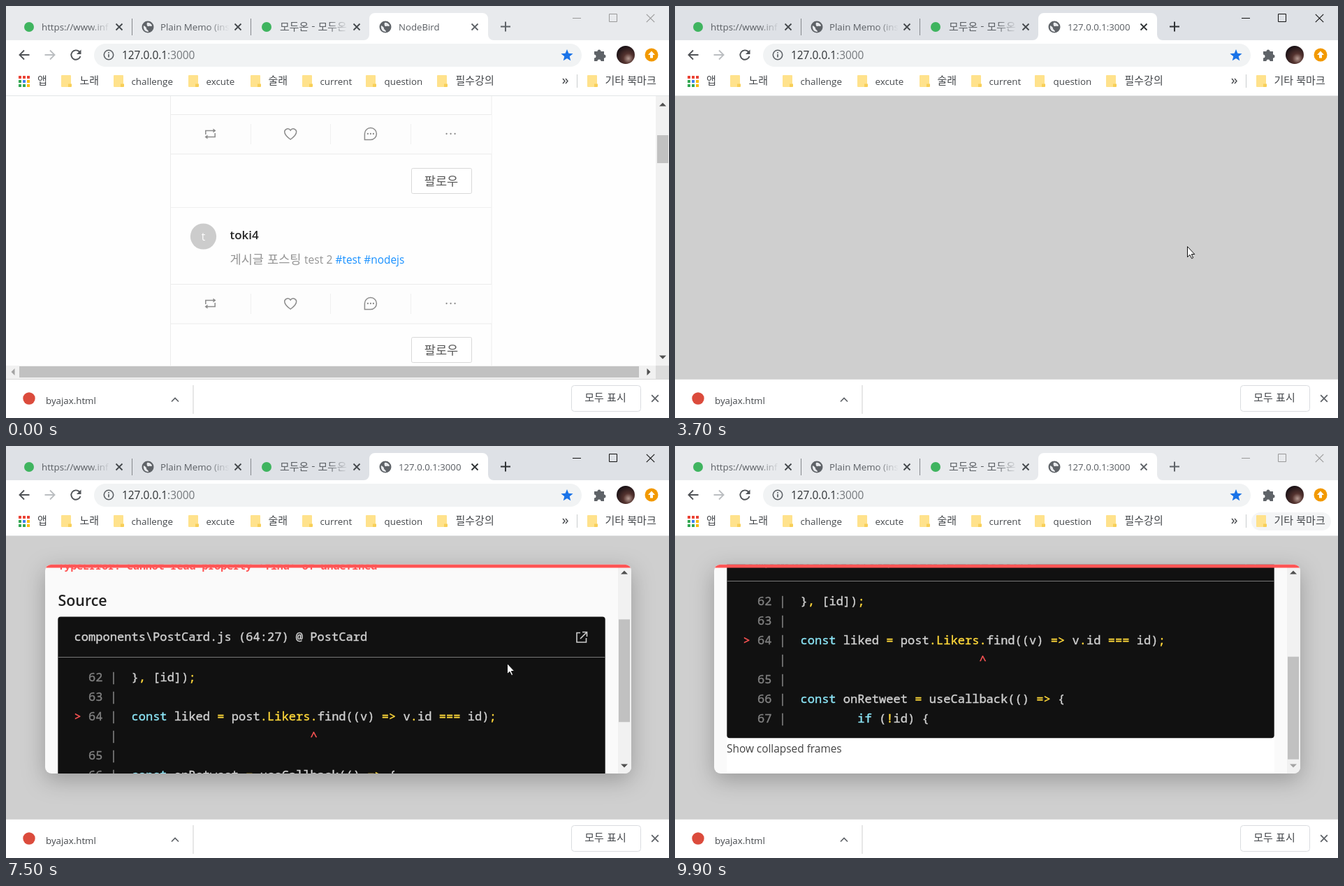
Write an HTML page that moves like this. It is 949 px wide and 590 px high and loops after 10 s.

```html
<!DOCTYPE html>
<html lang="ko">
<head>
<meta charset="utf-8">
<title>Browser window</title>
<style>
html, body { margin: 0; width: 100%; height: 100%; overflow: hidden; background: #fff; }
svg { display: block; }
text { font-family: "Open Sans", "Noto Sans", sans-serif; }
.ko { font-family: "Noto Sans CJK KR", "Noto Sans CJK", sans-serif; }
.mono { font-family: "Noto Sans Mono", monospace; }
.code { font-size: 17.07px; fill: currentColor; stroke: currentColor; stroke-width: .4px; }
.mid { text-anchor: middle; }
.line { fill: none; stroke: currentColor; }
</style>
</head>
<body>
<svg id="stage" width="949" height="590" viewBox="0 0 949 590"></svg>
<script>
const range = n => [...Array(n).keys()];
const rect = (x, y, w, h, fill, more = '') =>
  `<rect x="${x}" y="${y}" width="${w}" height="${h}" fill="${fill}" ${more}/>`;
const disc = (x, y, r, fill) => `<circle cx="${x}" cy="${y}" r="${r}" fill="${fill}"/>`;
const text = (x, y, size, fill, s, more = '') =>
  `<text x="${x}" y="${y}" font-size="${size}" fill="${fill}" ${more}>${s}</text>`;
const ko = (x, y, size, fill, s) => text(x, y, size, fill, s, 'class="ko"');
const mono = (x, y, s, color = '#d0d0d0') =>
  `<text x="${x}" y="${y}" color="${color}" class="mono code">${s}</text>`;
const line = (d, color, width = 1, more = '') =>
  `<path d="${d}" fill="none" stroke="${color}" stroke-width="${width}" ${more}/>`;
const at = (x, y, s, more = '') => `<g transform="translate(${x} ${y})" ${more}>${s}</g>`;
const cross = (x, y, r, color, width) =>
  line(`M${x - r} ${y - r}l${2 * r} ${2 * r}m0 ${-2 * r}l${-2 * r} ${2 * r}`, color, width);
const arrowHead = (x, y, turn, id = '', fill = '#505050') =>
  `<path ${id && `id="${id}"`} d="M-5 2.5L0-2.5 5 2.5z" fill="${fill}" transform="translate(${x} ${y}) rotate(${turn})"/>`;

// Browser frame
const globe = x => disc(x, 30, 8.5, '#5f6368') +
  at(x, 30, '<path d="M-6-2C-4-1-2 0-2 2S1 4 1 7C-4 7-7 3-6-2zM-1-6C1-7 5-5 6-2 5 0 3-2 1-1S-2-4-1-6z" fill="#e8eaed"/>');

function tabTitle(x, id, s, cls = '') {
  return `<linearGradient id="${id}" gradientUnits="userSpaceOnUse" x1="${x + 68}" x2="${x + 99}">
    <stop stop-color="#5a5e63"/><stop offset="1" stop-color="#5a5e63" stop-opacity="0"/></linearGradient>` +
    text(x, 34.5, cls ? 14.9 : 13.3, `url(#${id})`, s, cls);
}

const folder = x => at(x, 99, rect(0, 0, 14, 17, '#ffe28c', 'rx="1"') +
  '<path d="M10 17V12.500h5V16a1 1 0 0 1-1 1z" fill="#f8cf58"/>');

const tabs = rect(0, 0, 949, 49, '#dee1e6', 'id="strip"') +
  line('M180.500 18V42M350.500 18V42', '#85888c') +
  '<path d="M512 49a8 8 0 0 0 8-8V18a8 8 0 0 1 8-8H682a8 8 0 0 1 8 8V41a8 8 0 0 0 8 8z" fill="#fff"/>' +
  disc(33, 30, 7, '#3fb45f') + disc(373, 30, 7, '#3fb45f') + globe(203) + globe(543) +
  tabTitle(51, 'fadeA', 'https://www.inf') + tabTitle(221, 'fadeB', 'Plain Memo (inse') +
  tabTitle(392, 'fadeC', '모두온 - 모두온', 'class="ko"') +
  text(562, 34.5, 13.2, '#5a5e63', '', 'id="title"') +
  [162, 332, 502].map(x => cross(x, 30, 4.5, '#45494d', 1.8)).join('') +
  '<g id="controls">' + cross(671, 30, 4.5, 'currentColor', 1.8) +
  line('M708 29.500h14M715 22.500v14', 'currentColor', 2) + '</g><g id="buttons">' +
  line('M811 17.500h12M863.500 11.500h11v11h-11z', 'currentColor') + cross(922.5, 17.5, 5.7, 'currentColor', 1.1) + '</g>';

const star = range(10).map(i => {
  const a = i * Math.PI / 5, r = i % 2 ? 3.9 : 9;
  return [803 + r * Math.sin(a), 71 - r * Math.cos(a)].map(v => v.toFixed(1));
}).join(' ');

const toolbar = rect(0, 49, 949, 80, '#fff') +
  line('M33.500 70H19.500M26 63.500L19.500 70 26 76.500', '#505357', 1.9) +
  line('M55.500 70H69.500M63 63.500L69.500 70 63 76.500', '#bbbec1', 1.9) +
  line('M105 65.500A6.700 6.700 0 1 0 106.500 72', '#505357', 1.9) + '<path d="M107.500 62.500V69H101z" fill="#505357"/>' +
  rect(126, 54, 698, 33, '#f1f3f4', 'rx="16.5"') +
  '<circle cx="147" cy="70" r="6.700" fill="none" stroke="#5f6368" stroke-width="1.600"/>' +
  line('M147 69v4.500M147 66v1.700', '#5f6368', 1.7) +
  text(166, 76.3, 15.4, '#303336', '127.0.0.1<tspan fill="#74787c">:3000</tspan>') +
  `<polygon points="${star}" fill="#1a73e8"/>` +
  '<path d="M842 65h4.500a2.500 2.500 0 1 1 5 0H856v4.500a2.500 2.500 0 1 1 0 5V79h-4.500a2.500 2.500 0 1 0-5 0H842v-4.500a2.500 2.500 0 1 0 0-5z" fill="#5f6368"/>' +
  `<radialGradient id="photo" cx=".65" cy=".7" r=".7"><stop stop-color="#b59a92"/>
   <stop offset=".4" stop-color="#54332f"/><stop offset="1" stop-color="#1b1216"/></radialGradient>` +
  disc(887, 70, 13, 'url(#photo)') + disc(924, 70, 9.5, '#f29900') +
  '<path d="M924 64.500l5 5.500h-3v4.500h-4V70h-3z" fill="#fff"/>';

const dots = ['#ea4335', '#ea4335', '#ea4335', '#34a853', '#4285f4', '#fbbc05', '#34a853', '#34a853', '#fbbc05'];
const label = '#45484c';
const bookmarks = rect(825, 95, 114, 26, '#f4f5f6', 'rx="13" id="pill"') +
  dots.map((c, i) => rect(18 + i % 3 * 6, 100 + (i / 3 | 0) * 6, 4, 4, c)).join('') +
  [79, 154, 261, 350, 424, 515, 617, 832].map(folder).join('') +
  [[45, '앱'], [105.5, '노래'], [375.5, '술래'], [643.5, '필수강의'], [857.5, '기타 북마크']]
    .map(([x, s]) => ko(x, 112.3, 15, label, s)).join('') +
  [[179.5, 'challenge'], [286.5, 'excute'], [449.5, 'current'], [541.5, 'question']]
    .map(([x, s]) => text(x, 112.7, 13.4, label, s)).join('') +
  line('M797 104l3 3.500-3 3.500M801 104l3 3.500-3 3.500', label, 1.4) +
  line('M817.500 98V117', '#c9cccf') + line('M0 128.500H949', '#e3e5e7');

const downloads = rect(0, 534, 949, 56, '#fff') + line('M0 534.500H949', '#d8d8d8') +
  disc(33, 562, 8.7, '#db4b3c') + text(57, 570, 13.3, label, 'byajax.html') +
  line('M237 566.500l5-5 5 5', '#5f6368', 1.7) + line('M268 543V584', '#cfcfcf') +
  rect(809.5, 543.5, 99, 37, '#fff', 'rx="4" stroke="#dadce0"') +
  text(858, 566.3, 15, label, '모두 표시', 'class="ko mid"') + cross(929, 562, 4.8, '#5f6368', 1.8);

// Feed page
const retweet = `<path class="line" stroke-width="1.500" d="M-6.700 1V-4.500H5M6.700-1V4.500H-5"/>
  <path fill="currentColor" d="M4-7.500L8-4.500 4-1.500zM-4 7.500L-8 4.500-4 1.500z"/>`;
const heart = '<path class="line" stroke-width="1.500" d="M0 8C-5 4.500-8.500 1-8.500-3A4.600 4.600 0 0 1 0-5 4.600 4.600 0 0 1 8.500-3C8.500 1 5 4.500 0 8z"/>';
const ellipsis = gap => [-gap, 0, gap].map(x => disc(x, 0, 1.15, 'currentColor')).join('');
const message = '<path class="line" stroke-width="1.500" d="M-8.500 8.500V0A8.500 8.500 0 1 1 0 8.500z"/>' + ellipsis(4);

const actions = (y, id = 'top') => rect(236, y, 459, 57, '#fdfdfd') +
  line(`M236 ${y + .5}H695M236 ${y + 57}H695`, '#ececec', 1.2) +
  line(`M350.500 ${y + 14}v29m114-29v29m115-29v29`, '#f0f0f0') +
  [retweet, heart, message, ellipsis(6)].map((s, i) =>
    at(292.5 + i * 114.7, y + 28, s, `color="#8c8c8c" ${i ? '' : `id="${id}"`}`)).join('');
const follow = y => rect(580.5, y + .5, 86, 36, '#fff', 'rx="2" stroke="#d9d9d9"') +
  text(623, y + 25, 17.6, '#595959', '팔로우', 'class="ko mid"');

const page = rect(0, 129, 949, 405, '#fefefe') + line('M235.500 129V515M695 129V515', '#ececec') +
  actions(155) + follow(232) + line('M236 288.500H695', '#f0f0f0') +
  disc(282.5, 330, 18.6, '#ccc') + text(282.5, 335.5, 15.5, '#fff', 't', 'class="mid"') +
  text(320.5, 333.5, 17, '#262626', 'toki4', 'font-weight="600"') +
  ko(320.5, 368.5, 17.6, '#959595', '게시글 포스팅') + text(427, 368.5, 15.7, '#959595', 'test 2') +
  text(471.5, 368.5, 15.4, '#1890ff', '#test #nodejs') +
  actions(398, 'retweet') + follow(474) +
  rect(930, 129, 19, 386, '#f1f1f1') + rect(932, 185, 16, 40, '#c1c1c1') +
  arrowHead(940, 141, 0) + arrowHead(940, 503, 180) +
  rect(0, 515, 930, 19, '#f1f1f1') + rect(19, 516, 887, 16, '#c1c1c1') +
  arrowHead(10, 524, -90, '', '#a3a3a3') + arrowHead(920, 524, 90) + rect(930, 515, 19, 19, '#dcdcdc');

// Error dialog
const paint = s => s.replace(/\b(const|if)\b|Likers|[,.;=>!]+/g, (m, word) =>
  `<tspan color="${word ? '#8be4f5' : '#ffd83a'}">${m.replace(/>/g, '&gt;')}</tspan>`);
const col = n => 97.5 + n * 10.242;
const rows = [
  [62, 8, '}, [id]);'], [63, 8, ''], [64, 8, 'const liked = post.Likers.find((v) => v.id === id);'],
  ['', 8, ''], [65, 8, ''], [66, 8, 'const onRetweet = useCallback(() => {'], [67, 16, 'if (!id) {']
];
const code = rows.map(([n, c, s], i) => {
  const y = 457 + i * 28;
  return mono(col(2), y, n, '#808080') + mono(col(5), y, '|', '#808080') + mono(col(c), y, paint(s));
}).join('') + mono(col(0), 513, '&gt;', '#ff5555') + mono(col(33), 541, '^', '#ff5555');

const content = rect(75, 195, 56, 28, '#ffeaea', 'rx="4"') + line('M103 195v28', '#fafafa', 1.5) +
  line('M95 209H82M88 203l-6 6 6 6M110 209h13M117 203l6 6-6 6', '#ffa5a5', 1.9) +
  text(155, 216, 15.4, '#808080', '1 of 1 unhandled error') + cross(843, 210, 7.8, '#8c8c8c', 2) +
  text(74.5, 270, 21.8, '#222', 'Unhandled Runtime Error', 'font-weight="700"') +
  text(74.5, 296.5, 14.93, '#ff5555', "TypeError: Cannot read property 'find' of undefined", 'class="mono" font-weight="700"') +
  text(74.5, 348.5, 21.4, '#222', 'Source', 'font-weight="600"') +
  rect(74.3, 640, 783.4, 90, '#fff') + rect(74.3, 364.6, 783.4, 282.6, '#111', 'rx="4"') +
  line('M74.500 422.500H857.500', '#777') + mono(col(0), 399, 'components\\PostCard.js (64:27) @ PostCard') +
  line('M822 387.500h-5V401h13.500v-6M825 386.500h6.500V393M831 387l-9 9', '#ccc', 1.6) + code +
  text(74, 668, 15.4, '#444', 'Show collapsed frames');

const dialog = `<clipPath id="round">${rect(56, 169.7, 839, 299.3, '#000', 'rx="9"')}</clipPath>` +
  rect(56, 169.7, 839, 299.3, '#fafafa', 'rx="9" style="filter:drop-shadow(0 9px 16px rgba(0,0,0,.26))"') +
  `<g clip-path="url(#round)"><g id="content">${content}</g>` +
  rect(876, 174, 19, 295, '#f1f1f1') + rect(877, 189.5, 16, 147, '#c1c1c1', 'id="thumb"') +
  arrowHead(885, 181, 0, 'up') + arrowHead(885, 458, 180, 'down') +
  rect(56, 169, 839, 5.4, '#ff5555') + '</g>';

const arrow = '<path id="arrow" d="M.500.500V15.500L4 12.300 6.600 17.500 8.700 16.500 6.300 11.500H10.800z" fill="#fff" stroke="#111"/>';
const hand = `<path id="hand" d="M-1.500 13V1.500a1.600 1.600 0 0 1 3.200 0V7q3-1 3.500.700 3-.500 3.300 1 2-.300 2 1.800v5
  l-1.800 6H-.500L-4.500 13q-.500-2 1-2z" fill="#fff" stroke="#111"/>`;

const $ = id => document.getElementById(id);
$('stage').innerHTML = `<g id="feed">${page}</g><g id="blank">${rect(0, 129, 949, 405, '#cfcfcf')}</g>
  <g id="dialog">${dialog}</g>${tabs}${toolbar}${bookmarks}${downloads}<g id="pointer">${arrow}${hand}</g>`;

// Motion: [time, ...values]
const pointerPath = [
  [100, 794, 165], [800, 284, 434], [1100, 295, 425], [2200, 295, 425], [2600, 635, 308], [2900, 635, 308],
  [3000, 672, 273], [3100, 702, 278], [3400, 702, 278], [3700, 733, 344], [6000, 733, 344], [6200, 718, 311],
  [6300, 718, 311], [6400, 717, 311], [8800, 717, 311], [8900, 717, 309], [9500, 880, 108], [9700, 949, 95]
];
const scrollPath = [[6900, 0], [7000, 14], [7100, 80], [7200, 113], [7400, 113], [7500, 120], [7600, 190], [7700, 229]];

function sample(path, t) {
  const i = path.findIndex(k => k[0] > t);
  if (i === 0) return path[0].slice(1);
  if (i < 0) return path.at(-1).slice(1);
  const a = path[i - 1], b = path[i], f = (t - a[0]) / (b[0] - a[0]);
  return a.slice(1).map((v, n) => v + (b[n + 1] - v) * f);
}
const show = (id, on) => $(id).setAttribute('display', on ? 'inline' : 'none');
const set = (id, name, value) => $(id).setAttribute(name, value);

function draw(now) {
  const t = Math.floor(now % 10000 / 100) * 100;
  const active = t >= 1500 && t < 9900;
  set('strip', 'fill', active ? '#dee1e6' : '#e8eaed');
  set('controls', 'color', active ? '#303336' : '#5f6368');
  set('buttons', 'color', active ? '#111' : '#999');
  $('title').textContent = t < 2000 ? 'NodeBird' : '127.0.0.1:3000';
  show('pill', t >= 9500);
  show('feed', t < 1800);
  show('blank', t >= 1800);
  show('dialog', t >= 5100);

  const [scroll] = sample(scrollPath, t);
  set('content', 'transform', `translate(0 ${-scroll})`);
  set('thumb', 'y', 189.5 + scroll * .49);
  set('up', 'fill', scroll > 0 ? '#505050' : '#a3a3a3');
  set('down', 'fill', scroll < 229 ? '#505050' : '#a3a3a3');

  const [x, y] = sample(pointerPath, t).map(Math.round);
  const hover = t < 1800 && x < 350 && y > 398;
  set('pointer', 'transform', `translate(${x} ${y})`);
  show('pointer', t >= 100 && t < 9700);
  show('hand', hover);
  show('arrow', !hover);
  set('retweet', 'color', hover ? '#1890ff' : '#8c8c8c');
}

const start = performance.now();
function tick() {
  draw(performance.now() - start);
  requestAnimationFrame(tick);
}
tick();
</script>
</body>
</html>
```
